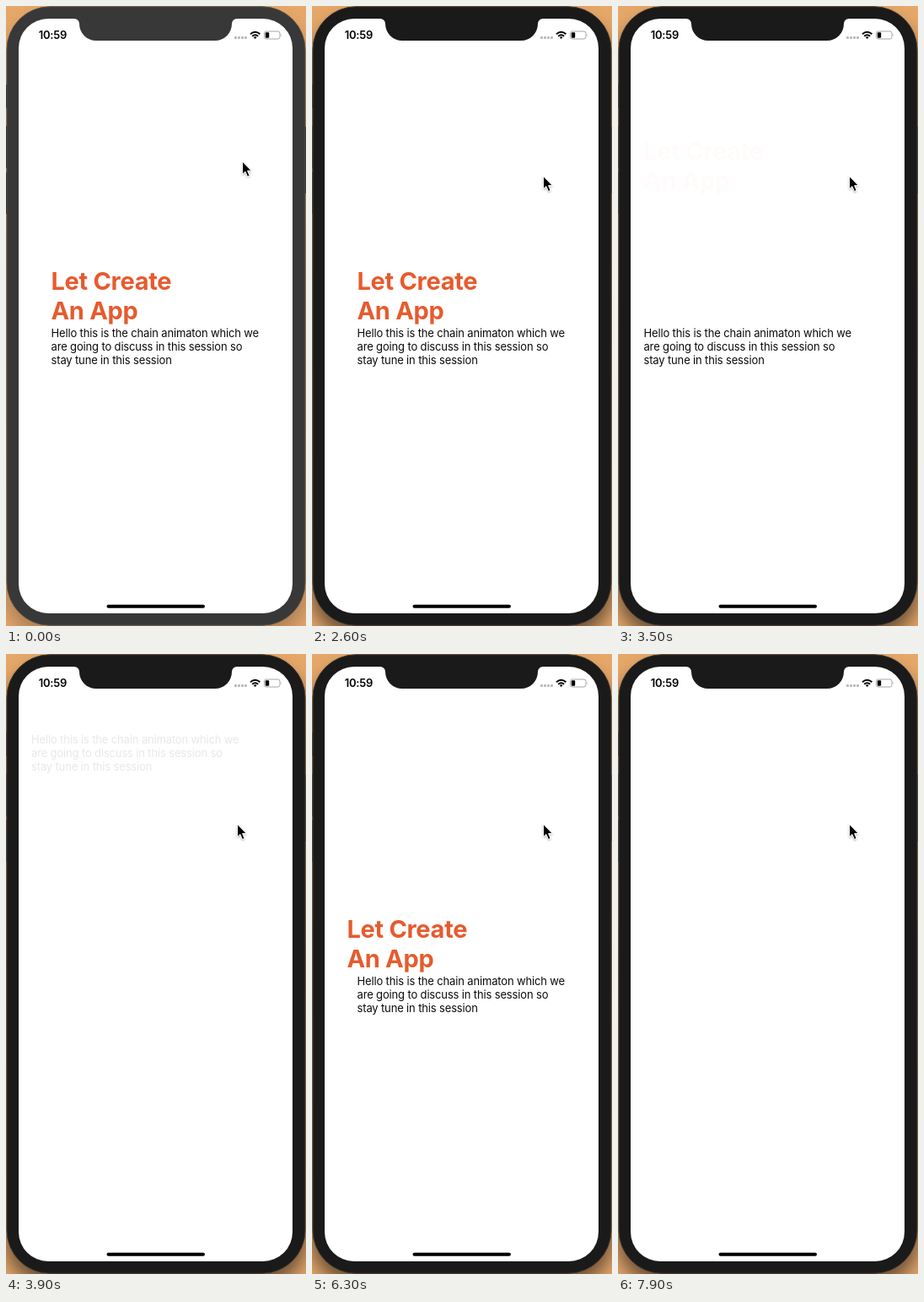
Recreate the animation shown at these times as an HTML page. Size 356 px wide and 734 px high, loop 8000 ms.

```html
<!DOCTYPE html>
<html lang="en">
<head>
<meta charset="utf-8">
<title>Chain animation</title>
<style>
html, body { margin: 0; width: 100%; height: 100%; overflow: hidden; }
svg { display: block; width: 100%; height: 100%; }
text { font-family: Inter, "Liberation Sans", sans-serif; }
#title { font-size: 29px; font-weight: 700; letter-spacing: -0.3px; fill: #e65b2e; }
#body { font-size: 13px; letter-spacing: -0.15px; fill: #0a0a0a; }
#clock { font-size: 13px; font-weight: 600; letter-spacing: -0.2px; }
</style>
</head>
<body>
<svg viewBox="0 0 356 734">
  <defs>
    <linearGradient id="wood" x1="0" y1="0" x2="0" y2="1">
      <stop offset="0" stop-color="#e6a869"/>
      <stop offset=".5" stop-color="#c9925c"/>
      <stop offset="1" stop-color="#e0a56c"/>
    </linearGradient>
    <filter id="soft" x="-20%" y="-20%" width="140%" height="140%">
      <feGaussianBlur stdDeviation="10"/>
    </filter>
    <filter id="drop" x="-50%" y="-50%" width="200%" height="200%">
      <feDropShadow dx="0" dy="1" stdDeviation="1" flood-opacity=".35"/>
    </filter>
  </defs>

  <rect width="356" height="734" fill="url(#wood)"/>
  <rect id="shade" x="0" y="14" width="356" height="734" rx="54" filter="url(#soft)"/>

  <path id="buttons" d="M0 93h2v28h-2zM0 142h2v50h-2zM0 197h2v49h-2zM354 143h2v79h-2z" fill="#1c1c1e"/>
  <rect id="bezel" x="1" y="0.8" width="354" height="732.4" rx="51" stroke-width="1"/>
  <path fill="#fff" d="M50 15H81A6 6 0 0 1 87 21A20 20 0 0 0 107 41H248A20 20 0 0 0 268 21A6 6 0 0 1 274 15H305
    A35 35 0 0 1 340 50V684A35 35 0 0 1 305 719H50A35 35 0 0 1 15 684V50A35 35 0 0 1 50 15Z"/>

  <text id="clock" x="38.7" y="39">10:59</text>
  <g fill="#b9b9b9">
    <rect x="271" y="36" width="3" height="3" rx="1"/>
    <rect x="275" y="36" width="3" height="3" rx="1"/>
    <rect x="279" y="36" width="3" height="3" rx="1"/>
    <rect x="283" y="36" width="3" height="3" rx="1"/>
  </g>
  <g fill="none" stroke="#000" stroke-width="1.9">
    <path d="M290 33.3Q295.7 28.3 301.4 33.3"/>
    <path d="M292.2 35.7Q295.7 32.7 299.2 35.7"/>
    <path d="M293.8 36.9Q295.7 35.5 297.6 36.9L295.7 38.9Z" fill="#000" stroke="none"/>
  </g>
  <rect x="306.5" y="30" width="18.5" height="9" rx="2.4" fill="#fff" stroke="#a5a5a5"/>
  <rect x="307.8" y="31.2" width="4.4" height="6.6" rx="1" fill="#000"/>
  <path d="M326.2 33q1.3 1.5 0 3z" fill="#a5a5a5"/>
  <rect x="119.5" y="708.8" width="116.5" height="4" rx="2"/>

  <g id="title"><text x="53.5" y="336">Let Create</text><text x="53.5" y="371.3">An App</text></g>
  <g id="body">
    <text x="53.5" y="391.6">Hello this is the chain animaton which we</text>
    <text x="53.5" y="407.7">are going to discuss in this session so</text>
    <text x="53.5" y="423.7">stay tune in this session</text>
  </g>

  <path id="cursor" filter="url(#drop)" stroke="#fff" stroke-width="1" stroke-linejoin="round"
    d="M0 0V15.2L3.4 12L6 18L8.6 16.9L6.1 11.1H10.8Z"/>
</svg>
<script>
const LOOP = 8000;
const SLIDE = -23.5;
const FOCUS_AT = 2100;
const RESET_AT = 4450;
// Start of each phase: slide left, then rise and fade.
const labels = [
  { id: 'title', rise: -157, runs: [[2683, 3184], [6208, 6751]] },
  { id: 'body', rise: -314, runs: [[3184, 3684], [6751, 7251]] }
];
const el = id => document.getElementById(id);
const clamp = v => Math.max(0, Math.min(1, v));
const ease = v => v * v * (3 - 2 * v);

// Critically damped spring that settles in about half a second.
function spring(t, start, rate = 18.5) {
  const u = Math.max(0, t - start) / 1000 * rate;
  return 1 - (1 + u) * Math.exp(-u);
}

function pose(t, [first, second]) {
  const back = first < RESET_AT ? 1 - spring(t, RESET_AT, 13) : 1;
  return { slide: spring(t, first) * back, rise: spring(t, second) * back };
}

function drawLabel({ id, rise, runs }, t) {
  const p = pose(t, t < 6000 ? runs[0] : runs[1]);
  const node = el(id);
  node.setAttribute('transform', `translate(${SLIDE * p.slide} ${rise * p.rise})`);
  node.setAttribute('opacity', p.rise > 0.998 ? 0 : 1 - p.rise);
}

function draw(t) {
  const active = t >= FOCUS_AT;
  el('bezel').setAttribute('fill', active ? '#1a1a1a' : '#383838');
  el('bezel').setAttribute('stroke', active ? '#3d3833' : '#55504b');
  el('shade').setAttribute('opacity', active ? 0.5 : 0.22);
  el('buttons').setAttribute('opacity', active ? 0.5 : 1);
  labels.forEach(label => drawLabel(label, t));
  const m = ease(clamp((t - 750) / 450));
  el('cursor').setAttribute('transform', `translate(${280.5 - 6 * m} ${184 + 17.5 * m})`);
}

function tick() {
  draw(performance.now() % LOOP);
  requestAnimationFrame(tick);
}
tick();
</script>
</body>
</html>
```
